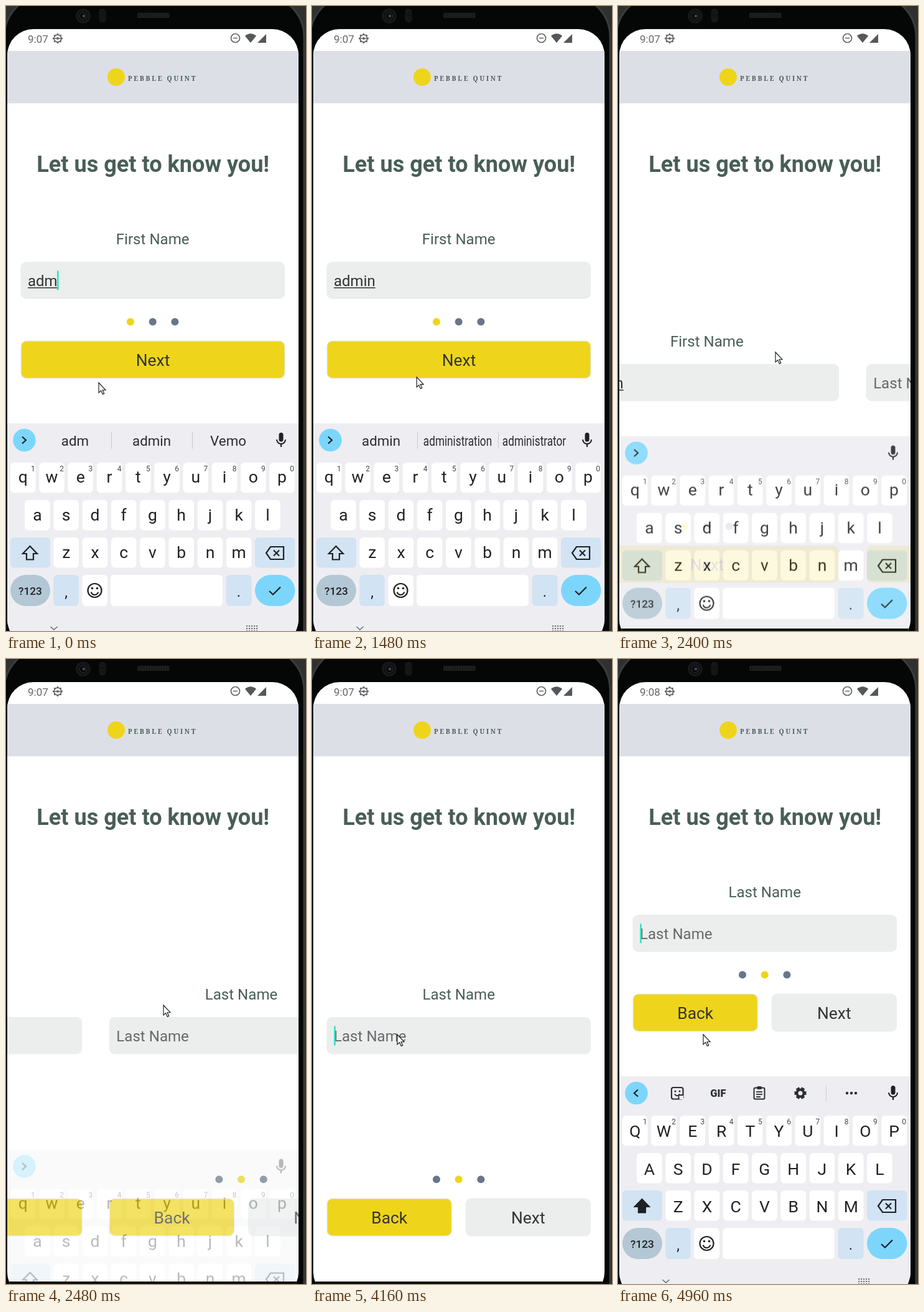
Write an HTML page with a canvas that moves like this. It is 482 px wide and 1002 px high and loops after 5000 ms.

```html
<!DOCTYPE html>
<html lang="en">
<head>
<meta charset="utf-8">
<title>Sign-up form</title>
<style>
html, body { margin: 0; width: 100%; height: 100%; overflow: hidden; background: #000; }
canvas { display: block; width: 482px; height: 1002px; }
</style>
</head>
<body>
<canvas id="stage" width="482" height="1002"></canvas>
<script>
const W = 482, H = 1002, LOOP = 5000, PAGE = 468;
const GREEN = '#495e57', YELLOW = '#eed51b', FIELD = '#ebeeed', SLATE = '#67768a';
const INK = '#333333', KEY_INK = '#1f2124', SKY = '#7cd6fc', PALE = '#d2e3f3';
const SQUEEZE = 0.77;

const stage = document.getElementById('stage').getContext('2d');
const layer = document.createElement('canvas');
layer.width = W;
layer.height = H;
const boardCtx = layer.getContext('2d');
let g = stage;

const clamp = v => Math.min(1, Math.max(0, v));
const span = (t, from, to) => clamp((t - from) / (to - from));
const smooth = p => p * p * (3 - 2 * p);
const accel = p => Math.pow(p, 1.75);
const settle = ms => ms <= 0 ? 0 : 1 - (1 + ms / 50) * Math.exp(-ms / 50);

function box(x, y, w, h, r, fill, stroke) {
  g.beginPath();
  g.roundRect(x, y, w, h, r);
  if (fill) { g.fillStyle = fill; g.fill(); }
  if (stroke) { g.strokeStyle = stroke; g.stroke(); }
}

function disc(x, y, r, fill) {
  g.beginPath();
  g.arc(x, y, r, 0, Math.PI * 2);
  g.fillStyle = fill;
  g.fill();
}

function ring(x, y, r, color, width) {
  g.beginPath();
  g.arc(x, y, r, 0, Math.PI * 2);
  g.lineWidth = width;
  g.strokeStyle = color;
  g.stroke();
}

function trace(points, closed) {
  g.beginPath();
  points.forEach(([x, y], i) => i ? g.lineTo(x, y) : g.moveTo(x, y));
  if (closed) g.closePath();
}

function line(points, color, width, closed) {
  trace(points, closed);
  g.lineWidth = width;
  g.strokeStyle = color;
  g.stroke();
}

function shape(points, fill) {
  trace(points, true);
  g.fillStyle = fill;
  g.fill();
}

function label(text, x, y, size, color, align = 'center', weight = 400) {
  g.font = `${weight} ${size}px Roboto, sans-serif`;
  g.textAlign = align;
  g.fillStyle = color;
  g.fillText(text, x, y);
}

function cog(x, y, r, tooth, color, width, n) {
  ring(x, y, r, color, width);
  for (let i = 0; i < n; i++) {
    const a = i * Math.PI * 2 / n, c = Math.cos(a), s = Math.sin(a);
    line([[x + c * r, y + s * r], [x + c * tooth, y + s * tooth]], color, width * 1.4);
  }
}

// Phone body
function phone() {
  g.fillStyle = '#2f3131';
  g.fillRect(0, 0, W, H);
  g.lineWidth = 3;
  box(-3, -18, 482, 1100, 68, '#050606', '#3a3c3c');
  disc(124, 16, 12, '#161717');
  disc(124, 16, 8, '#070808');
  ring(124, 16, 6, '#25282b', 1.5);
  disc(125, 16, 2.5, '#394350');
  box(149, 4, 12, 23, 6, '#121313');
  ring(155, 9, 3, '#1d1e1e', 1);
  ring(155, 21, 3, '#1d1e1e', 1);
  box(211, 11, 52, 8, 2, '#202121');
  for (let x = 213; x < 262; x += 4) line([[x, 12], [x + 2, 18]], '#0b0c0c', 1);
}

function statusBar(t) {
  const c = '#646668';
  label(t < 4500 ? '9:07' : '9:08', 35, 58.5, 17, c, 'left');
  cog(83, 52, 5.8, 8, c, 1.7, 8);
  line([[78, 52], [88, 52]], c, 1.5);
  disc(83, 52, 2, c);
  ring(368.5, 51.5, 7, c, 1.7);
  line([[365, 51.5], [372, 51.5]], c, 1.7);
  g.beginPath();
  g.moveTo(393, 59);
  g.lineTo(384, 48);
  g.quadraticCurveTo(393, 40.5, 402, 48);
  g.closePath();
  g.fillStyle = '#55575a';
  g.fill();
  shape([[404, 59], [418, 45], [418, 59]], '#55575a');
}

function header() {
  g.fillStyle = '#dddfe7';
  g.fillRect(2, 72, PAGE, 84);
  disc(177, 114, 14, YELLOW);
  g.font = '700 10.4px "Noto Serif", serif';
  g.textAlign = 'left';
  g.letterSpacing = '2.7px';
  g.fillStyle = GREEN;
  g.fillText('PEBBLE QUINT', 196, 119.5);
  g.letterSpacing = '0px';
  label("Let us get to know you!", 236.2, 266, 36.1, GREEN, 'center', 700);
}

function button(text, x, w, y, main) {
  box(x - .5, y - .5, w + 1, 61, 9, main ? '#e6e7e1' : FIELD);
  if (main) box(x + .8, y + .8, w - 1.6, 58.4, 8, YELLOW);
  label(text, x + w / 2, y + 40, 26.4, INK);
}

function caret(x, y) {
  g.fillStyle = '#20e3c0';
  g.fillRect(x, y, 2.4, 31);
}

// One step of the form; `open` is true while the keyboard takes its room
function page(i, t, open) {
  const top = open ? 410 : 574, foot = open ? 537 : 865;
  label(i ? 'Last Name' : 'First Name', 235.7, top - 28, 24.1, GREEN);
  box(23.5, top, 424.5, 59.5, 9, FIELD);
  for (let k = 0; k < 3; k++) disc(200 + k * 35.7, foot - 30.8, 6, k === i ? YELLOW : SLATE);

  if (i === 0) {
    const text = t < 720 ? 'adm' : t < 860 ? 'admi' : 'admin';
    const marked = t < 760 ? 'adm' : t < 920 ? 'admi' : 'admin';
    label(text, 35, top + 39, 24, INK, 'left');
    const end = 35 + g.measureText(text).width;
    g.fillStyle = INK;
    g.fillRect(35, top + 41, g.measureText(marked).width, 1.5);
    if (t < 1360 || t > 1860 && t < 2360) caret(end - .5, top + 14.5);
    button('Next', 24, 424, foot, true);
  } else {
    label('Last Name', 35, top + 39, 24.1, '#66696a', 'left');
    if (t > 3950 && t < 4450 || t >= 4950) caret(35.4, top + 14.5);
    button('Back', 24, 200.5, foot, true);
    button('Next', 247, 200.5, foot, false);
  }
}

function form(t, open) {
  const shift = PAGE * settle(t - 2360);
  [0, 1].forEach(i => {
    const dx = i * PAGE - shift;
    if (Math.abs(dx) >= PAGE - .3) return;
    g.save();
    g.translate(dx, 0);
    page(i, t, open);
    g.restore();
  });
}

// Keyboard
function suggestions(t) {
  const words = t < 760 ? ['adm', 'admin', 'Vemo']
    : t < 920 ? ['admi', 'admin', 'admit']
    : ['admin', 'administration', 'administrator'];
  words.forEach((word, i) => {
    g.save();
    g.translate(111 + i * 123, 704.5);
    if (word.length > 8) g.scale(SQUEEZE, 1);
    label(word, 0, 0, 22.3, '#2a2c30');
    g.restore();
  });
  [169.5, 299.5].forEach(x => line([[x, 682], [x, 710]], '#c9cad0', 1));
}

function tools() {
  const c = '#2c2f33';
  g.lineWidth = 2.2;
  box(86, 687, 18.5, 18.5, 3, null, c);
  shape([[98, 706], [105, 699], [105, 706]], '#eeeef2');
  line([[97.5, 705.5], [97.5, 699], [104.5, 699]], c, 1.8);
  disc(92, 693, 1.5, c);
  disc(99, 693, 1.5, c);
  g.beginPath();
  g.arc(95, 696, 4, .3, Math.PI - .3);
  g.stroke();
  label('GIF', 161, 701.5, 16.5, c, 'center', 900);
  g.lineWidth = 2;
  box(218.5, 687.5, 17, 18, 2, null, c);
  box(223, 685, 8, 5, 2, c);
  [694, 698, 702].forEach((y, i) => line([[222, y], [i < 2 ? 232 : 229, y]], c, 1.8));
  cog(293, 696, 5.5, 9.5, c, 4, 6);
  line([[334.5, 683], [334.5, 709]], '#c9cad0', 1);
  [368, 375, 382].forEach(x => disc(x, 696, 2.2, c));
}

function mic() {
  box(438.5, 684, 7, 14.5, 3.5, KEY_INK);
  g.beginPath();
  g.arc(442, 695, 7, 0, Math.PI);
  g.lineWidth = 2;
  g.strokeStyle = KEY_INK;
  g.stroke();
  line([[442, 702], [442, 707]], KEY_INK, 2.2);
}

function row(letters, x, y, caps, hints) {
  const base = y + (caps ? 35 : 33) - (hints ? 1.3 : 0);
  [...letters].forEach((ch, i) => {
    const cx = x + i * 46.25;
    box(cx - 20.3, y, 40.6, 48.5, 6, '#fff');
    label(caps ? ch.toUpperCase() : ch, cx, base, 26.5, KEY_INK);
    if (hints) label((i + 1) % 10, cx + 16, y + 13.5, 12, '#44474b');
  });
}

function keyboard(t) {
  const second = t > 3000;
  g.clearRect(0, 0, W, H);
  g.fillStyle = '#eeeef2';
  g.fillRect(2, 669, PAGE, 400);
  disc(29.5, 696, 18.3, SKY);
  const d = second ? -1 : 1;
  line([[29 - 3 * d, 690.5], [29 + 3 * d, 696], [29 - 3 * d, 701.5]], KEY_INK, 2.2);
  if (second) tools();
  else if (t < 2355) suggestions(t);
  mic();

  row('qwertyuiop', 27.3, 732, second, true);
  row('asdfghjkl', 50.4, 792, second);
  row('zxcvbnm', 96.7, 852, second);

  box(7, 852, 64, 48.5, 6, PALE);
  const arrow = [[38.5, 866], [50, 878], [44, 878], [44, 887.5], [33, 887.5], [33, 878], [27, 878]];
  if (second) shape(arrow, KEY_INK);
  line(arrow, KEY_INK, 2.2, true);
  box(400, 852, 64.5, 48.5, 6, PALE);
  line([[418, 877], [425, 867], [446, 867], [446, 887], [425, 887]], KEY_INK, 2.2, true);
  line([[430, 872.5], [439, 881.5]], KEY_INK, 2.2);
  line([[439, 872.5], [430, 881.5]], KEY_INK, 2.2);

  box(7, 912, 64, 50, 25, '#b3c7d4');
  label('?123', 39, 944, 17.3, KEY_INK, 'center', 500);
  box(76.3, 912, 40.6, 50, 6, PALE);
  label(',', 96.5, 948, 24, KEY_INK);
  box(122.5, 912, 40.6, 50, 6, '#fff');
  ring(142.5, 937, 11, KEY_INK, 2.2);
  disc(138.5, 933.5, 1.8, KEY_INK);
  disc(146.5, 933.5, 1.8, KEY_INK);
  g.beginPath();
  g.arc(142.5, 938, 6, .25, Math.PI - .25);
  g.lineWidth = 2.2;
  g.stroke();
  box(168, 912, 180, 50, 6, '#fff');
  box(353.6, 912, 41, 50, 6, PALE);
  label('.', 374, 947, 24, KEY_INK);
  box(400, 912, 64.5, 50, 25, SKY);
  line([[423, 938], [429, 943.5], [441, 931.5]], KEY_INK, 2.2);

  line([[71.5, 995], [77, 1000], [82.5, 995]], '#6c6e72', 1.6);
  g.fillStyle = '#77797d';
  for (let y = 993; y < 1002; y += 4)
    for (let x = 386; x < 404; x += 4) g.fillRect(x, y, 2.2, 2.2);
}

function boardPose(t) {
  if (t < 2354) return { dy: 0, alpha: 1 };
  if (t < 2554) {
    const f = accel(span(t, 2354, 2554));
    return { dy: 260 * f, alpha: Math.pow(1 - f, 1.9) };
  }
  const f = 1 - Math.pow(1 - span(t, 4280, 4480), 2.5);
  return { dy: 260 * (1 - f), alpha: Math.min(1, 2 * f) };
}

function pointer(t) {
  const a = smooth(span(t, 1300, 1960)), b = smooth(span(t, 2680, 3360));
  g.save();
  g.translate(149 + 104 * a - 116 * b, 604 - 49 * a + 47 * b);
  const tip = [[0, 0], [0, 16], [3.6, 12.6], [6.3, 18.6], [8.7, 17.5], [6.1, 11.7], [11, 11.7]];
  shape(tip, '#fff');
  line(tip, '#111', 1.1, true);
  g.restore();
}

function draw(t) {
  const open = t < 2362 || t >= 4320;
  const pose = boardPose(t);
  if (pose.alpha > 0) {
    g = boardCtx;
    keyboard(t);
  }
  g = stage;
  phone();
  g.save();
  g.beginPath();
  g.roundRect(2, 37, PAGE, 988, 42);
  g.clip();
  g.fillStyle = '#fff';
  g.fillRect(0, 0, W, H);
  form(t, open);
  header();
  statusBar(t);
  if (pose.alpha > 0) {
    g.globalAlpha = pose.alpha;
    g.drawImage(layer, 0, pose.dy);
    g.globalAlpha = 1;
  }
  if (pose.dy > 0) {
    g.fillStyle = '#0a100d';
    g.fillRect(2, 998, PAGE, 4);
  }
  g.restore();
  pointer(t);
}

const start = performance.now();
function tick() {
  draw((performance.now() - start) % LOOP);
  requestAnimationFrame(tick);
}
tick();
</script>
</body>
</html>
```
